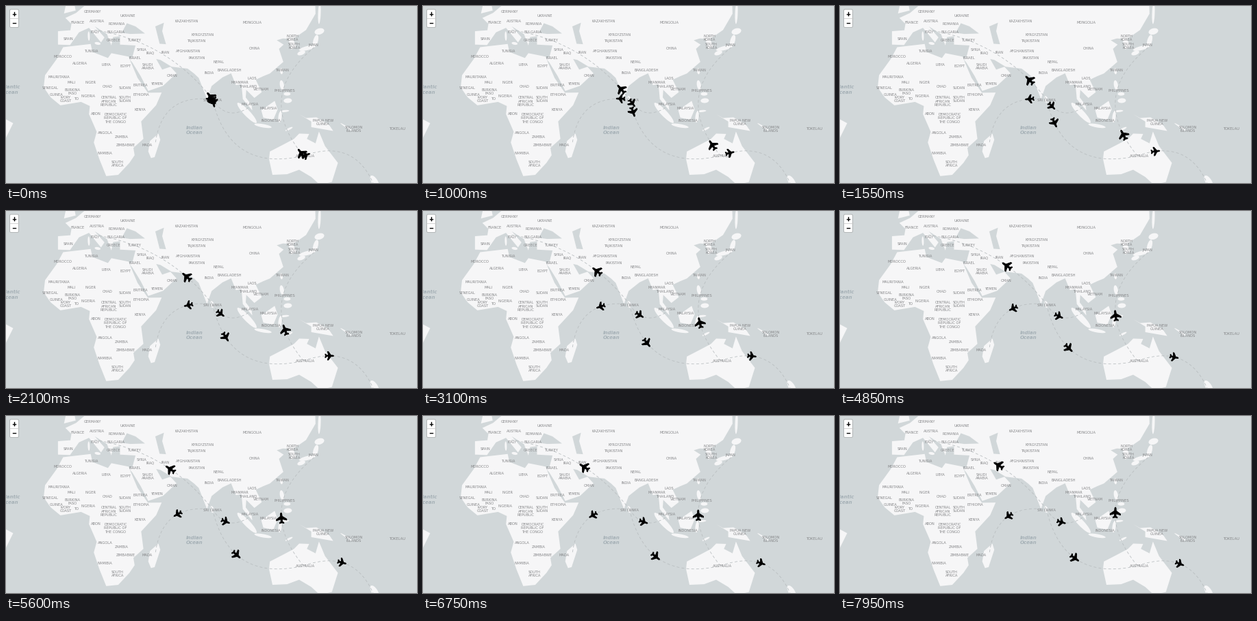
A matplotlib script for the animation above (8 s loop, 600 by 260 pixels).

```python
import numpy as np
import matplotlib.pyplot as plt
from matplotlib.animation import FuncAnimation
from matplotlib.patches import Ellipse, FancyBboxPatch, Polygon

W, H, DPI = 600, 260, 100
STEP, FRAMES = 50, 160
SEA, LAND = "#d1d7d9", "#f6f6f7"
LABEL, OCEAN, DASH = "#858688", "#a6b1b7", "#b9bec0"

plt.rcParams["font.family"] = "DejaVu Sans"
fig = plt.figure(figsize=(W / DPI, H / DPI), dpi=DPI, facecolor=SEA)
ax = fig.add_axes([0, 0, 1, 1])
ax.set_xlim(0, W)
ax.set_ylim(H, 0)
ax.axis("off")


def px(size):
    return size * 72 / DPI


def project(lon, lat):
    """Web Mercator, degrees to stage pixels."""
    return np.array([98.5 + 2.515 * lon,
                     157 - 144.1 * np.arcsinh(np.tan(np.radians(lat)))])


def area(*points, color=LAND, z=1):
    ax.add_patch(Polygon([project(*p) for p in points], fc=color, ec="none", zorder=z))


def island(a, b, width):
    a, b = project(*a), project(*b)
    dx, dy = b - a
    ax.add_patch(Ellipse((a + b) / 2, np.hypot(dx, dy), width,
                         angle=np.degrees(np.arctan2(dy, dx)), fc=LAND, ec="none", zorder=1))


# Africa, Madagascar, Brazil
area((-6, 35.8), (10, 37.3), (11, 33.5), (20, 30.5), (22, 32.9), (32, 31.2), (33.5, 28),
     (37.2, 20), (43.2, 11.7), (51.2, 11.8), (48, 4.5), (39.3, -5), (40.6, -15),
     (34.8, -20), (35.5, -24), (32.5, -28), (26, -34), (19, -34.6), (15, -26),
     (11.8, -17), (13.5, -11), (9, -0.7), (9.5, 4), (4.4, 6.4), (-7.6, 4.4),
     (-13.2, 9), (-17.3, 14.7), (-16.5, 21.5), (-9.7, 30))
area((49.3, -12), (50.4, -15.5), (47.1, -25), (45, -25.5), (43.4, -22), (44.4, -16.2))
area((-41, -2.8), (-35, -6), (-39, -14), (-42, -22.5))

# Europe and the Middle East
area((-1.8, 43.4), (-9, 43), (-9, 37), (-2, 36.8), (3.2, 42.5), (9, 44.4), (16, 38),
     (18, 40.3), (12.4, 45), (19.4, 41.8), (22, 36.6), (23, 40.4), (27, 40.8), (27, 37),
     (36, 36.6), (34.3, 31.3), (32.5, 30), (34.3, 28), (39, 21), (43.4, 12.7),
     (52, 15.6), (59.8, 22.5), (56.3, 26), (51.5, 24.5), (48, 30), (50.5, 29.5),
     (57, 26), (66.5, 25), (70, 60), (8, 60), (8, 53.7), (1.5, 50.3), (-4.7, 48.4), (-1.2, 46))
area((-5.5, 50.1), (1.3, 51.2), (0, 55), (-4.5, 53))
area((28, 42.3), (31, 46.3), (36, 45), (41.5, 42), (33, 41.8), color=SEA, z=2)
area((47.5, 45), (52.5, 46.5), (51.5, 43), (53.7, 37.2), (50, 37.4), color=SEA, z=2)

# South and East Asia
area((66, 25.2), (70, 22.4), (72.7, 20), (77.5, 8.1), (80.2, 15.5), (86.5, 20.3),
     (91.5, 22.5), (94.3, 16), (97.5, 16.5), (98.3, 8), (103.8, 1.4), (103.4, 4.5),
     (100, 9), (100.3, 13.3), (105, 8.7), (109.3, 12), (105.8, 19), (110.3, 21),
     (114, 22.4), (121.8, 28.5), (119.3, 35), (122, 37), (118, 39), (121.5, 39.8),
     (124.7, 39.7), (126.4, 34.6), (129.3, 36), (127.5, 39.6), (135, 43.5),
     (140.5, 50), (140, 60), (66, 60))

# Borneo, New Guinea, Australia
area((109, 1.5), (116.8, 7), (118.5, 2), (116, -4), (110.2, -2.8))
area((131, -0.8), (135, -3), (141, -2.6), (148, -6.5), (150.8, -10.5), (138, -8.3), (138, -5))
area((114, -22), (113.5, -26), (115.5, -34), (124, -33.7), (131, -31.5), (138, -35),
     (143, -38.7), (150, -37.4), (153.5, -28), (146, -19), (142.5, -10.8),
     (140.5, -17.5), (135.5, -15), (136.8, -12.2), (131, -12), (128, -15), (122.2, -18))

for start, end, width in (
        ((8.8, 42.9), (9, 38.8), 3), ((12.3, 37.8), (15.7, 37.3), 4),    # Italian isles
        ((80, 9.8), (81, 5.9), 5), ((120.5, 25.3), (120.9, 22), 4),      # Sri Lanka, Taiwan
        ((95.2, 5.8), (106.2, -5.8), 9), ((105, -6.6), (115, -8.4), 5),  # Sumatra, Java
        ((119.5, -5.6), (120.3, 1), 5), ((120, 0.8), (125.2, 1.3), 3),   # Sulawesi
        ((120.5, 18.7), (121.5, 13.3), 6), ((122, 11), (126, 11), 5),    # Philippines
        ((122, 7), (126.8, 7.3), 7), ((123, -10.4), (127.2, -8.3), 3),   # ... and Timor
        ((130, 32.3), (134.5, 33.7), 6), ((131, 34.4), (140.5, 36.3), 6),
        ((139.6, 36), (141.5, 41.4), 7), ((140, 42.3), (145.5, 43.5), 9),
        ((142.5, 46), (143, 54), 4), ((155, -6), (162, -10.5), 2),
        ((172.7, -34.4), (177, -40), 9)):
    island(start, end, width)


def labels(size=5.1, **places):
    for name, (x, y) in places.items():
        ax.text(x, y, name.replace("__", "\n").replace("_", " "), fontsize=px(size),
                color=LABEL, ha="center", va="center", linespacing=1.05, zorder=5)


labels(GERMANY=(126, 8), UKRAINE=(178, 14), FRANCE=(105, 25), AUSTRIA=(133, 23),
       ROMANIA=(162, 27), BULGARIA=(161, 39), ITALY=(130, 38), SPAIN=(91, 48),
       GREECE=(157, 51), TURKEY=(187, 51), SYRIA=(198, 65), IRAQ=(211, 69),
       IRAN=(233, 69), ISRAEL=(188, 76), SAUDI__ARABIA=(207, 89), YEMEN=(220, 115),
       OMAN=(243, 103))
labels(TUNISIA=(124, 67), MOROCCO=(83, 75), ALGERIA=(108, 84), LIBYA=(146, 87),
       EGYPT=(174, 89), MAURITANIA=(77, 105), MALI=(96, 112), NIGER=(124, 112),
       CHAD=(148, 118), SUDAN=(174, 120), ERITREA=(196, 116), SENEGAL=(65, 120),
       BURKINA__FASO=(97, 126), GUINEA=(74, 130), IVORY__COAST=(87, 137), TO=(103, 137),
       NIGERIA=(120, 133), CENTRAL__AFRICAN__REPUBLIC=(150, 140), SOUTH__SUDAN=(174, 137),
       ETHIOPIA=(197, 131), KENYA=(196, 153), ABON=(131, 159),
       DEMOCRATIC__REPUBLIC_OF__THE_CONGO=(160, 165), ANGOLA=(145, 187),
       ZAMBIA=(169, 193), ZIMBABWE=(175, 204), NAMIBIA=(144, 216),
       SOUTH__AFRICA=(163, 232), MADA=(206, 205))
labels(KAZAKHSTAN=(264, 23), KYRGYZSTAN=(287, 43), TAJIKISTAN=(278, 52),
       AFGHANISTAN=(266, 67), PAKISTAN=(279, 77), NEPAL=(311, 83), INDIA=(297, 99),
       BANGLADESH=(326, 94), SRI_LANKA=(302, 139), MONGOLIA=(360, 24), CHINA=(363, 63),
       MYANMAR=(341, 113), LAOS=(359, 106), THAILAND=(353, 119), VIETNAM=(372, 123),
       PHILIPPINES=(407, 125), TAIWAN=(403, 95), NORTH__KOREA=(418, 47),
       SOUTH__KOREA=(421, 59), JAPAN=(449, 58))
labels(MALAYSIA=(356, 145), INDONESIA=(387, 169), AUSTRALIA=(437, 221),
       PAPUA_NEW__GUINEA=(463, 171), SOLOMON__ISLANDS=(508, 181), TOKELAU=(571, 180))
labels(MALAYSIA=(383, 151))

for text, x, y, align in (("Indian", 275.5, 179, "center"), ("Ocean", 275.5, 186, "center"),
                          ("Atlantic", 20.5, 119, "right"), ("Ocean", 18.5, 127, "right")):
    ax.text(x, y, text, fontsize=px(7), weight="bold", style="italic", color=OCEAN,
            ha=align, va="center", zorder=5)

# Zoom buttons
ax.add_patch(FancyBboxPatch((5.5, 5), 13, 26.5, boxstyle="round,pad=0,rounding_size=1.8",
                            fc="white", ec="#b2b6b7", lw=px(1), zorder=8))
ax.plot([5.5, 18.5], [18.3, 18.3], color="#c8c8c8", lw=px(0.8), zorder=9)
for xs, ys in (((9.8, 14.2), (11.6, 11.6)), ((12, 12), (9.4, 13.8)), ((9.8, 14.2), (24.8, 24.8))):
    ax.plot(xs, ys, color="black", lw=px(1.4), zorder=9)

HALF = [(0, -1), (0.12, -0.88), (0.16, -0.35), (0.95, 0.2), (0.95, 0.42),
        (0.17, 0.18), (0.13, 0.6), (0.4, 0.8), (0.4, 0.96), (0, 0.85)]
PLANE = np.array(HALF + [(-x, y) for x, y in HALF[-2:0:-1]])


class Flight:
    """Plane on a quadratic Bezier; bend is the control offset per unit of length."""

    def __init__(self, start, end, bend, radius):
        self.a, self.c = project(*start), project(*end)
        dx, dy = self.c - self.a
        self.b = (self.a + self.c) / 2 + bend * np.array([-dy, dx])
        self.radius = radius
        route = np.array([self.at(t) for t in np.linspace(0, 1, 80)])
        ax.plot(*route.T, color=DASH, lw=px(0.8), dashes=(5, 4), zorder=4)
        self.patch = ax.add_patch(Polygon(PLANE, fc="black", ec="black", lw=px(0.9),
                                          joinstyle="round", zorder=7))

    def at(self, t):
        return (1 - t) ** 2 * self.a + 2 * t * (1 - t) * self.b + t * t * self.c

    def move(self, t):
        dx, dy = (1 - t) * (self.b - self.a) + t * (self.c - self.b)
        turn = np.array([[-dy, dx], [-dx, -dy]]) / np.hypot(dx, dy)
        self.patch.set_xy(self.at(t) + self.radius * PLANE @ turn)


SRI_LANKA, AUSTRALIA = (80.7, 7.9), (133.5, -24.3)
flights = [Flight(SRI_LANKA, (12.3, 43.5), 0.2, 8),           # Italy
           Flight(SRI_LANKA, (47.5, -18), 0.5, 6.5),          # Madagascar
           Flight(SRI_LANKA, (101.7, 3.1), 0.5, 6.5),         # Malaysia
           Flight(SRI_LANKA, AUSTRALIA, 0.5, 7.3),
           Flight(AUSTRALIA, (139.7, 35.7), -0.5, 8),         # Japan
           Flight(AUSTRALIA, (175.5, -41), -0.5, 6.5)]        # New Zealand

# Gentle start, quick stretch, long slow-down
SECONDS = np.array([0, 1, 2.1, 3.1, 4.2, 5.6, 8])
TRAVEL = np.array([0.02, 0.09, 0.265, 0.328, 0.37, 0.415, 0.466])
SPEED = np.gradient(TRAVEL, SECONDS)


def travel(s):
    k = min(np.searchsorted(SECONDS, s, side="right") - 1, len(SECONDS) - 2)
    h = SECONDS[k + 1] - SECONDS[k]
    u = (s - SECONDS[k]) / h
    ease = u * u * (3 - 2 * u)
    return ((1 - ease) * TRAVEL[k] + ease * TRAVEL[k + 1]
            + h * u * (1 - u) * ((1 - u) * SPEED[k] - u * SPEED[k + 1]))


def update(i):
    t = travel(i * STEP / 1000)
    for flight in flights:
        flight.move(t)
    return [flight.patch for flight in flights]


anim = FuncAnimation(fig, update, frames=FRAMES, interval=STEP, repeat=True,
                     repeat_delay=0, blit=False)
plt.show()
```
